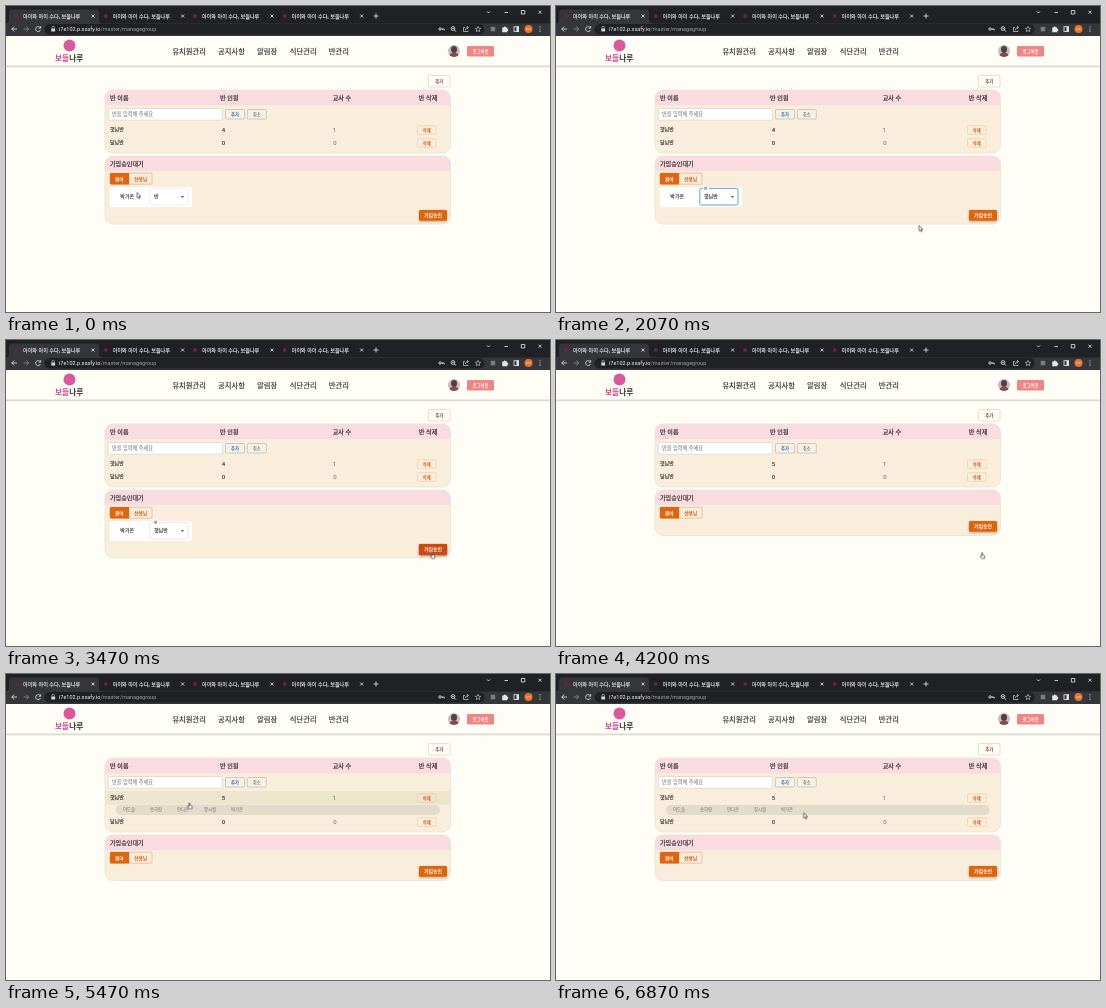
An HTML page that plays this animation: 544x306 px, repeating every 6.94 s.

```html
<!DOCTYPE html>
<html lang="ko">
<head>
<meta charset="utf-8">
<title>반 관리</title>
<style>
html, body { margin: 0; width: 100%; height: 100%; overflow: hidden; background: #fefef6; }
svg { display: block; width: 100vw; height: 100vh; }
text { font-family: "Noto Sans CJK KR", "Noto Sans CJK", "Noto Sans", sans-serif; fill: #333; }
.tab text { font-size: 5.1px; fill: #eceef0; stroke: #eceef0; stroke-width: .12; }
.url { font: 5.5px Roboto, sans-serif; fill: #9aa0a6; }
.line { fill: none; stroke: #d5d7da; stroke-width: .9; }
.nav text { font-size: 7.3px; stroke: #333; stroke-width: .18; }
.head text { font-size: 6.1px; stroke: #333; stroke-width: .22; }
.cell { font-size: 5px; stroke: #333; stroke-width: .12; }
.num { font: 500 6px Roboto, sans-serif; }
.pale { font-weight: 400; fill: #666; }
.btn { font-size: 4.3px; text-anchor: middle; }
.on { fill: #fff; font-weight: 700; }
.orange { fill: #dc5a18; font-weight: 700; }
.blue { fill: #2b66b5; font-weight: 700; }
.edge { fill: none; stroke: #f0bd9a; stroke-width: .5; }
.rim { fill: #f9eedb; stroke: #e9e2d3; stroke-width: .8; }
.names { font-size: 4.4px; }
.names text { fill: #77716a; }

/* every part shares the same 6.94 s clock */
.a { animation: 6.94s linear infinite; }
.hard { animation-timing-function: step-end; }
.cursor { animation-name: move; animation-timing-function: ease-in-out; }
.arrow { animation-name: arrow; }
.hand { animation-name: hand; }
.menu { animation-name: menu; transform-origin: 163px 199px; }
.outline { animation-name: outline; }
.label { animation-name: label; }
.notch { animation-name: notch; }
.caret { animation-name: caret; transform-origin: 176.5px 191px; }
.item { animation-name: item; }
.chosen { animation-name: chosen; }
.card { animation-name: card; }
.box2 { animation-name: box2; }
.approve { animation-name: approve; }
.press { animation-name: press; }
.five { animation-name: five; }
.hover { animation-name: hover; }
.ripple { animation-name: ripple; }
.box1 { animation-name: box1; }
.below { animation-name: below; }
.list { animation-name: list; }

@keyframes move {
  0%, 3.9% { transform: translate(131px, 186.5px); }
  6.8%, 13.5% { transform: translate(165.7px, 186.5px); }
  17.5%, 21% { transform: translate(157px, 206px); }
  29.2%, 31% { transform: translate(363px, 219.5px); }
  40%, 61.5% { transform: translate(426.2px, 212.5px); }
  69%, 73.2% { transform: translate(196px, 120px); }
  78.2%, 83% { transform: translate(183.5px, 128.7px); }
  92%, 94% { transform: translate(242px, 140px); }
  98.5%, 100% { transform: translate(247.7px, 138.7px); }
}
@keyframes arrow {
  0% { visibility: visible; }
  5.2% { visibility: hidden; }
  23% { visibility: visible; }
  38.5% { visibility: hidden; }
  63% { visibility: visible; }
  66.8% { visibility: hidden; }
  85%, 100% { visibility: visible; }
}
@keyframes hand {
  0% { visibility: hidden; }
  5.2% { visibility: visible; }
  23% { visibility: hidden; }
  38.5% { visibility: visible; }
  63% { visibility: hidden; }
  66.8% { visibility: visible; }
  85%, 100% { visibility: hidden; }
}
@keyframes menu {
  0%, 9.6% { opacity: 0; transform: scale(.8); }
  12%, 20.2% { opacity: 1; transform: none; }
  23%, 100% { opacity: 0; transform: none; }
}
@keyframes outline {
  0% { stroke: #dedede; stroke-width: .5; }
  9.6% { stroke: #3c8bd6; stroke-width: .8; }
  48.4%, 100% { stroke: #d0d0d0; stroke-width: .5; }
}
@keyframes label {
  0%, 9.6% { transform: translate(148px, 192.4px); fill: #444; }
  12%, 48.3% { transform: translate(148px, 183.8px) scale(.75); fill: #1976d2; }
  48.5%, 100% { transform: translate(148px, 183.8px) scale(.75); fill: #555; }
}
@keyframes notch { 0% { opacity: 0; } 10.6%, 100% { opacity: 1; } }
@keyframes caret { 0% { transform: none; } 9.6% { transform: rotate(180deg); } 20.2%, 100% { transform: none; } }
@keyframes item { 0% { opacity: 0; } 16.4% { opacity: 1; } 23%, 100% { opacity: 0; } }
@keyframes chosen { 0% { opacity: 0; } 20.2%, 100% { opacity: 1; } }
@keyframes card { 0% { opacity: 1; } 53.8%, 100% { opacity: 0; } }
@keyframes five { 0% { opacity: 0; } 53.8%, 100% { opacity: 1; } }
@keyframes box2 { 0% { height: 68px; } 53.8%, 100% { height: 45.5px; } }
@keyframes approve { 0% { transform: none; } 53.8%, 100% { transform: translateY(-23px); } }
@keyframes press { 0%, 38.5% { opacity: 0; } 41%, 52.8% { opacity: 1; } 54%, 100% { opacity: 0; } }
@keyframes hover { 0%, 66.5% { opacity: 0; } 68.5%, 84.5% { opacity: 1; } 86%, 100% { opacity: 0; } }
@keyframes ripple {
  0%, 71.3% { r: 0; opacity: 0; }
  71.6% { r: 8px; opacity: 1; }
  73.05% { r: 54px; opacity: 1; }
  75% { r: 150px; opacity: .7; }
  78%, 100% { r: 250px; opacity: 0; }
}
@keyframes box1 { 0%, 73.6% { height: 63px; } 77.4%, 100% { height: 74px; } }
@keyframes below { 0%, 73.6% { transform: none; } 77.4%, 100% { transform: translateY(11px); } }
@keyframes list { 0%, 73.6% { height: 0; } 77.4%, 100% { height: 11px; } }
</style>
</head>
<body>
<svg viewBox="0 0 544 306" preserveAspectRatio="none">
  <defs>
    <filter id="soft" x="-30%" y="-30%" width="160%" height="180%">
      <feDropShadow dx="0" dy=".8" stdDeviation=".8" flood-opacity=".32"/>
    </filter>
    <clipPath id="clip1"><rect class="a box1" x="99" y="84" width="345.5" height="63" rx="8"/></clipPath>
    <clipPath id="clip2"><rect class="a hard box2" x="99" y="150" width="345.5" height="68" rx="8"/></clipPath>
    <clipPath id="clipRow"><rect x="99" y="117" width="345.5" height="13.5"/></clipPath>
    <clipPath id="clipList"><rect class="a list" x="99" y="130.5" width="345.5" height="0"/></clipPath>
    <clipPath id="face"><circle cx="448" cy="45" r="6"/></clipPath>
    <g id="cross"><path class="line" d="M-1.5-1.5 1.5 1.5M1.5-1.5-1.5 1.5"/></g>
    <g id="tab" class="tab">
      <circle cx="10" cy="10" r="1.9" fill="#6b2440"/>
      <text x="17" y="11.6">아이와 아이 수다, 보들나루</text>
      <use href="#cross" x="87" y="10"/>
    </g>
    <g id="remove">
      <rect class="edge" x="411.5" y="-4.3" width="18.5" height="8.6" rx="1"/>
      <text class="btn orange" x="420.7" y="1.6">삭제</text>
    </g>
  </defs>

  <!-- browser -->
  <rect width="544" height="30" fill="#202124"/>
  <path d="M0 17.5Q3 17 3 14V7Q3 3.5 6.5 3.5H89.5Q93 3.5 93 7V14Q93 17 96 17.5H544V30H0Z" fill="#35363a"/>
  <use href="#tab"/>
  <use href="#tab" x="89.7"/>
  <use href="#tab" x="179"/>
  <use href="#tab" x="268.7"/>
  <path class="line" d="M367.5 10h5M370 7.5v5M481 5.5l1.5 1.5 1.5-1.5M498.5 6.5h3.5M515.3 4.5h3.5v3.5h-3.5z"/>
  <use href="#cross" x="534" y="6.2"/>
  <rect x="38.5" y="18" width="440" height="10.5" rx="5.2" fill="#202124"/>
  <path class="line" d="M11 23H5.8M8.2 20.5 5.7 23l2.5 2.5M34.3 21.7A2.5 2.5 0 1 0 34.5 24M34.7 20.2v2h-2"/>
  <path class="line" d="M17.5 23h5M20.3 20.5l2.5 2.5-2.5 2.5" style="stroke:#85878b"/>
  <rect x="45.3" y="22.5" width="3.8" height="3" fill="#d5d7da"/>
  <path class="line" d="M46 22.5v-1a1.2 1.2 0 0 1 2.4 0v1" style="stroke-width:.6"/>
  <text class="url" x="53" y="25"><tspan fill="#f1f3f4">i7e102.p.ssafy.io</tspan>/master/managegroup</text>
  <g class="line">
    <circle cx="434" cy="23" r="1.2"/>
    <path d="M435.2 23h3v1.4M436.7 23v1"/>
    <circle cx="447" cy="22.5" r="1.9"/>
    <path d="M448.4 24l1.6 1.7M446.2 22.5h1.7"/>
    <path d="M459 21.5h-1.5v4h4.5v-1M459.3 24q.2-2.5 3-2.5M461 20l1.5 1.5-1.5 1.5" stroke-width=".7"/>
    <path d="M472 20.4l.8 1.8 1.9.2-1.4 1.3.4 1.9-1.7-1-1.7 1 .4-1.9-1.4-1.3 1.9-.2z" stroke-width=".6"/>
    <rect x="508" y="20.7" width="4.5" height="4.8"/>
  </g>
  <rect x="484.7" y="20.8" width="4.5" height="4.5" fill="#777e84"/>
  <path d="M496.2 21.5h1.5a1.1 1.1 0 0 1 2.2 0h1.4v1.5a1.1 1.1 0 0 1 0 2.2v1h-5.1z" fill="#e4e5e7"/>
  <path d="M510.5 20.5h2.3v5.2h-2.3z" fill="#e4e5e7"/>
  <circle cx="522.5" cy="23" r="4" fill="#e8742c"/>
  <path d="M520 23h5" stroke="#f5d4bd" stroke-width=".8"/>
  <g fill="#d5d7da"><circle cx="534" cy="20.8" r=".6"/><circle cx="534" cy="23" r=".6"/><circle cx="534" cy="25.2" r=".6"/></g>

  <!-- site header -->
  <rect y="30" width="544" height="30" fill="#fefef6"/>
  <rect y="59.7" width="544" height=".9" fill="#bcbcb7"/>
  <rect y="60.6" width="544" height="1" fill="#ebebe4"/>
  <circle cx="63.5" cy="39.5" r="6" fill="#db589d"/>
  <text x="49" y="55" font-size="7.7" font-weight="700"><tspan fill="#d84c8f">보들</tspan>나루</text>
  <g class="nav">
    <text x="166.4" y="47.7">유치원관리</text>
    <text x="212" y="47.7">공지사항</text>
    <text x="251" y="47.7">알림장</text>
    <text x="283.8" y="47.7">식단관리</text>
    <text x="322.8" y="47.7">반관리</text>
  </g>
  <g clip-path="url(#face)">
    <rect x="441" y="38" width="14" height="14" fill="#c4bec4"/>
    <ellipse cx="448" cy="43.5" rx="3" ry="3.4" fill="#5a3c40"/>
    <ellipse cx="448" cy="51" rx="5" ry="4.5" fill="#86494d"/>
  </g>
  <rect x="461" y="40" width="27" height="10.5" rx="1.2" fill="#f08585"/>
  <text class="btn on" x="474.5" y="46.8">로그아웃</text>

  <rect x="422.5" y="69.5" width="21.5" height="11.5" rx="1.2" fill="#fffefa" stroke="#ecc3a7" stroke-width=".6"/>
  <text class="btn" x="433.2" y="76.8" style="fill:#8a3c10;font-weight:700">추가</text>

  <!-- class table -->
  <rect class="rim a box1" x="99" y="84" width="345.5" height="63" rx="8"/>
  <g clip-path="url(#clip1)">
    <rect x="99" y="84" width="345.5" height="15.3" fill="#fadce0"/>
    <g class="head">
      <text x="104" y="93.7">반 이름</text>
      <text x="214" y="93.7">반 인원</text>
      <text x="326.7" y="93.7">교사 수</text>
      <text x="412.8" y="93.7">반 삭제</text>
    </g>
    <rect x="102.3" y="102.5" width="114" height="11.7" rx="1" fill="#fff" stroke="#d2cdc4" stroke-width=".6"/>
    <text x="106" y="110.2" font-size="5.2" style="fill:#6c6c6c">반을 입력해 주세요</text>
    <g fill="#f8f0e3" stroke="#a6b3be" stroke-width=".6">
      <rect x="219.5" y="103.5" width="19" height="9.5" rx="1"/>
      <rect x="241.3" y="103.5" width="19" height="9.5" rx="1"/>
    </g>
    <text class="btn blue" x="229" y="109.9">추가</text>
    <text class="btn" x="250.8" y="109.9" style="fill:#3c526b">취소</text>

    <rect class="a hover" x="99" y="117" width="345.5" height="13.5" fill="#eee5ce" opacity="0"/>
    <g clip-path="url(#clipRow)"><circle class="a ripple" cx="196" cy="123.5" r="0" fill="#c9c1af"/></g>
    <text class="cell" x="104" y="125.2">햇님반</text>
    <text class="num a hard card" x="215.8" y="125.5">4</text>
    <text class="num a hard five" x="215.8" y="125.5">5</text>
    <text class="num pale" x="326.5" y="125.5">1</text>
    <use href="#remove" y="124"/>

    <g clip-path="url(#clipList)">
      <rect x="109.8" y="130.8" width="324" height="10.2" rx="5.1" fill="#e4dccb"/>
      <g class="names">
        <text x="117" y="137.3">이도솔</text>
        <text x="144" y="137.3">송하람</text>
        <text x="171" y="137.3">안다온</text>
        <text x="198" y="137.3">장시월</text>
        <text x="225" y="137.3">박가온</text>
      </g>
    </g>
    <g class="a below">
      <text class="cell" x="104" y="138.2">달님반</text>
      <text class="num" x="215.8" y="138.5">0</text>
      <text class="num pale" x="327.2" y="138.5">0</text>
      <use href="#remove" y="137"/>
    </g>
  </g>

  <!-- sign-up approval -->
  <g class="a below">
    <rect class="rim a hard box2" x="99" y="150" width="345.5" height="68" rx="8"/>
    <g clip-path="url(#clip2)">
      <rect x="99" y="150" width="345.5" height="15" fill="#fadce0"/>
    </g>
    <g class="head"><text x="104" y="159.5">가입승인대기</text></g>
    <rect x="104" y="167.2" width="42" height="11" rx="1.2" fill="#f9eedb" stroke="#e7a57b" stroke-width=".6"/>
    <path d="M105.2 167h18v11.5h-18q-1.2 0-1.2-1.2v-9.1q0-1.2 1.2-1.2z" fill="#df650f"/>
    <text class="btn on" x="113.3" y="174.5" style="font-size:4.7px">원아</text>
    <text class="btn orange" x="134.5" y="174.5" style="font-size:4.8px">선생님</text>

    <g class="a hard card">
      <rect x="104" y="181" width="82" height="20" rx="2" fill="#fff"/>
      <text class="cell" x="114.3" y="192.4">박가온</text>
      <rect class="a hard outline" x="143.8" y="182.4" width="38.2" height="16.6" rx="1.5" fill="none"/>
      <rect class="a hard notch" x="146.8" y="181.4" width="6" height="2.5" fill="#fff"/>
      <text class="cell a label">반</text>
      <text class="cell a hard chosen" x="148" y="192.4">햇님반</text>
      <path class="a hard caret" d="M174.7 190.1h3.6l-1.8 1.9z" fill="#666"/>
    </g>

    <g class="a hard approve">
      <rect x="413" y="204" width="28" height="10.8" rx="1.3" fill="#df650f" filter="url(#soft)"/>
      <rect class="a press" x="413" y="204" width="28" height="10.8" rx="1.3" fill="#cf480d" filter="url(#soft)" opacity="0"/>
      <text class="btn on" x="427" y="211.1" style="font-size:4.9px">가입승인</text>
    </g>
  </g>

  <g class="a menu" opacity="0">
    <rect x="143.6" y="199.5" width="38.5" height="26.3" rx="1.2" fill="#fff" filter="url(#soft)"/>
    <rect class="a hard item" x="143.6" y="201.8" width="38.5" height="10.7" fill="#f3f3f3"/>
    <text class="cell" x="148.7" y="208.8">햇님반</text>
    <text class="cell" x="148.7" y="219.3">달님반</text>
  </g>

  <g class="a cursor">
    <path class="a hard arrow" d="M0 0v5.4l1.3-1.2.9 2 .9-.4-.9-1.9h1.7z" fill="#fff" stroke="#222" stroke-width=".6"/>
    <path class="a hard hand" d="M-.5.4q.5-.8 1 0v2.1l1.8.5q.5.3.4.9l-.4 2.1H-.6L-1.8 3.7q0-.8.7-.5l.6.6z" fill="#fff" stroke="#222" stroke-width=".6"/>
  </g>
</svg>
</body>
</html>
```
